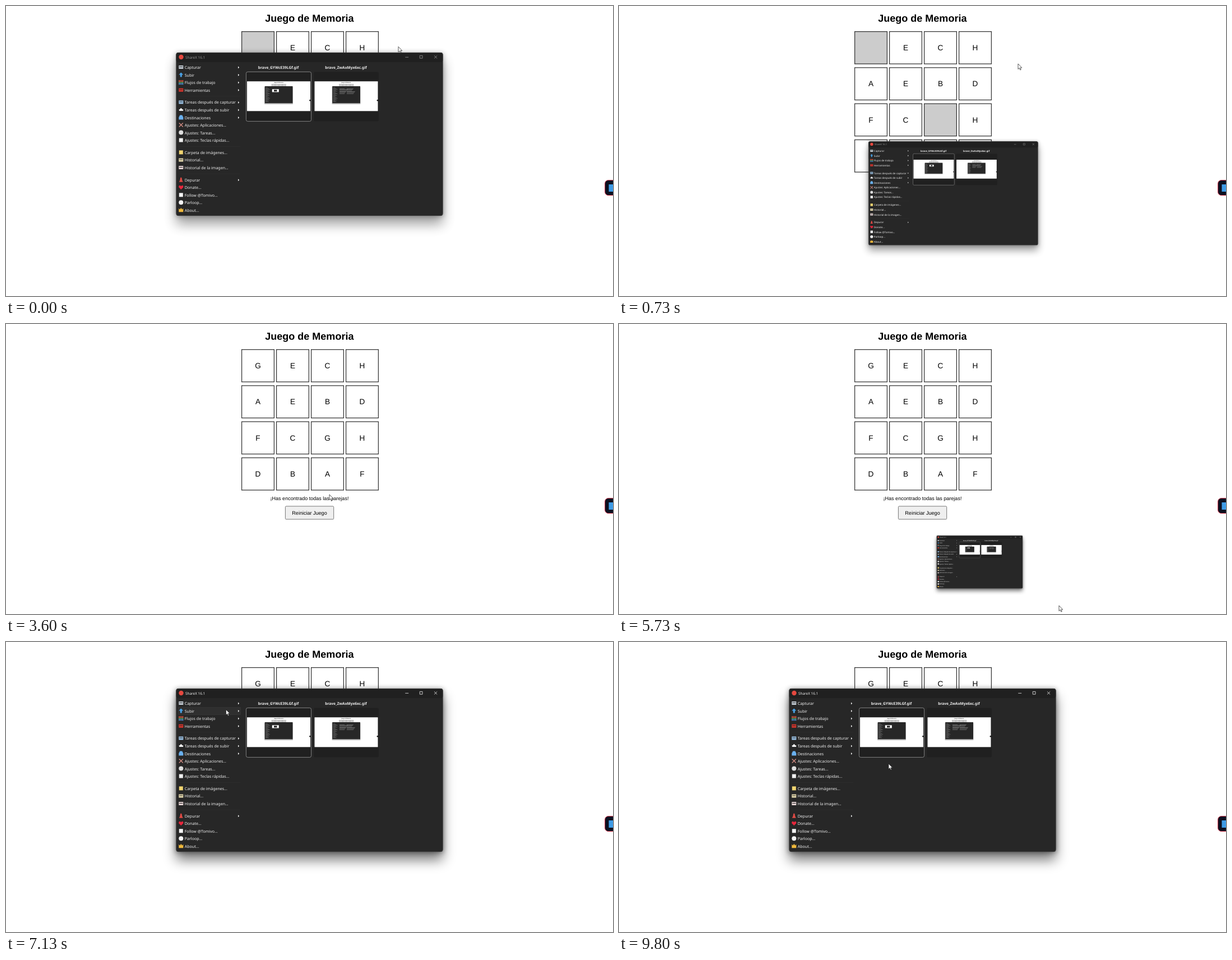
These frames come from a looping animation (1083 by 517 pixels, 9870 ms). An HTML page:

```html
<!DOCTYPE html>
<html lang="es">
<head>
<meta charset="utf-8">
<title>Juego de Memoria</title>
<style>
html, body { margin: 0; width: 100%; height: 100%; overflow: hidden; background: #fff; }
svg { display: block; width: 1083px; height: 517px; }
text { font-family: "Liberation Sans", Arial, sans-serif; text-rendering: geometricPrecision; }
.ui text { font-family: "Noto Sans", "Open Sans", sans-serif; fill: #f0f0f0; }
.ui .tiny { fill: #111; }
.mid { text-anchor: middle; }
</style>
</head>
<body>
<svg viewBox="0 0 1083 517">
  <defs>
    <filter id="soft" x="-20%" y="-30%" width="140%" height="160%"><feGaussianBlur stdDeviation="11"/></filter>
    <filter id="near" x="-20%" y="-20%" width="140%" height="140%"><feGaussianBlur stdDeviation="5"/></filter>
    <linearGradient id="rgb" x2="0" y2="1">
      <stop offset=".3" stop-color="#e0503c"/><stop offset=".5" stop-color="#4fae4a"/><stop offset=".8" stop-color="#4a8fe0"/>
    </linearGradient>
  </defs>
  <g id="page"></g>
  <g id="win" class="ui"></g>
  <g id="badge"></g>
  <path id="arrow" d="M0 0V9.6L2.2 7.6L3.8 11.1L5.3 10.4L3.8 7.1H6.8Z" fill="#fff" stroke="#222" stroke-width=".75"/>
  <g id="hand" fill="#fff" stroke="#222" stroke-width=".75">
    <path d="M-1 .8Q0-.6 1 .8V4.6L4.6 5.3Q6 5.6 5.9 7L5.3 10.4L4.5 12.9H-.6L-1.2 11.4L-3.7 7.9Q-4 6.4-3 6.2Q-2 6.2-1 7.4Z"/>
    <path d="M1.9 4.8V6.6M3.5 5.1V6.8" stroke-width=".5"/>
  </g>
</svg>
<script>
const $ = id => document.getElementById(id);
const page = $('page'), win = $('win');

function add(parent, tag, attrs, text) {
  const el = document.createElementNS('http://www.w3.org/2000/svg', tag);
  for (const k in attrs) el.setAttribute(k, attrs[k]);
  if (text) el.textContent = text;
  parent.append(el);
  return el;
}
const box = (p, x, y, width, height, fill, more) => add(p, 'rect', { x, y, width, height, fill, ...more });
const label = (p, x, y, size, text, more) => add(p, 'text', { x, y, 'font-size': size, ...more }, text);
const line = (p, d, stroke, width) => add(p, 'path', { d, stroke, fill: 'none', 'stroke-width': width });
const show = (el, on) => { el.style.display = on ? '' : 'none'; };

// Page
label(page, 541.3, 28, 18.05, 'Juego de Memoria', { class: 'mid', 'font-weight': 'bold' });
const cards = [...'GECHAEBDFCGHDBAF'].map((ch, i) => {
  const x = 420.6 + i % 4 * 62, y = 45.6 + Math.floor(i / 4) * 64.3;
  const face = box(page, x, y, 57.8, 57.6, '#fff', { stroke: '#333', 'stroke-width': 1.25 });
  const letter = label(page, x + 28.9, y + 33.4, 13.6, ch, { class: 'mid' });
  return { x, y, face, letter };
});
const message = label(page, 541.5, 313.5, 9.02, '¡Has encontrado todas las parejas!', { class: 'mid' });
const button = box(page, 498.4, 324.9, 86.3, 23.2, '#efefef', { stroke: '#767676', rx: 1.5 });
label(page, 541.5, 339.6, 9.05, 'Reiniciar Juego', { class: 'mid' });

box($('badge'), 1068.6, 310.6, 24, 27, '#0c1020', { rx: 6, stroke: '#d8384c' });
box($('badge'), 1075.5, 318, 12, 13, '#3f9be6');

// Application window
const W = { x: 303.5, y: 83, w: 476, h: 291 };
const glow = add(win, 'g', {});
box(glow, W.x, W.y + 15, W.w, W.h, '#000', { filter: 'url(#soft)', opacity: .5 });
box(glow, W.x, W.y + 1, W.w, W.h, '#000', { filter: 'url(#near)', opacity: .45 });
box(win, W.x, W.y, W.w, W.h, '#272727', { rx: 4 });
box(win, W.x, W.y, W.w, 17, '#202020', { rx: 4 });
box(win, W.x + .3, W.y + .3, W.w - .6, W.h - .6, 'none', { rx: 4, stroke: '#444', 'stroke-width': .6 });
add(win, 'circle', { cx: 312.5, cy: 91, r: 4.2, fill: '#e5483f' });
const bar = add(win, 'g', {});
label(bar, 320, 93.5, 6.4, 'ShareX 16.1');
line(bar, 'M712.3 91.3H718.2M738.3 88.4H743V93.2H738.3ZM764 88.4L769.2 93.5M769.2 88.4L764 93.5', '#f0f0f0', .8);
const hover = box(win, 307.4, 0, 111, 13, '#2f2f2f', { stroke: '#3a3a3a', 'stroke-width': .6 });

// Icon outlines in an 8 by 8 box
const shapes = {
  sheet: 'M0 1H8V7H0ZM1 3V4H7V3Z',
  square: 'M.5 .5H7.5V7.5H.5Z',
  disc: 'M0 4A4 4 0 0 1 8 4A4 4 0 0 1 0 4Z',
  up: 'M4 0L8 4H5.5V8H2.5V4H0Z',
  dots: 'M0 0H2V8H0ZM3 0H5V8H3ZM6 0H8V8H6Z',
  cloud: 'M1 6Q-1 3 2 3Q4-1 6 3Q9 3 7.5 6Z',
  drive: 'M2 0H6L8 4V8H0V4Z',
  cross: 'M1 0L4 3L7 0L8 1L5 4L8 7L7 8L4 5L1 8L0 7L3 4L0 1Z',
  cone: 'M3 0H5L6 5L7.5 8H.5L2 5Z',
  heart: 'M4 8L0 4Q-.5 .5 2.2 .5L4 2L5.8 .5Q8.5 .5 8 4Z',
  crown: 'M0 1L2 3L4 0L6 3L8 1V7.5H0Z'
};

// Each row: shape, colour, text; > opens a submenu, - is a gap
const menu = `sheet #c4ccd4 Capturar>
up #4aa3e8 Subir>
dots url(#rgb) Flujos de trabajo>
sheet #d8342c Herramientas>
-
sheet #9cc4e8 Tareas después de capturar>
cloud #eee Tareas después de subir>
drive #6ab0ee Destinaciones>
cross #cf8a80 Ajustes: Aplicaciones...
disc #ddd Ajustes: Tareas...
square #eee Ajustes: Teclas rápidas...
-
square #f0d470 Carpeta de imágenes...
sheet #e8dcb0 Historial...
sheet #e0d0d0 Historial de la imagen...
-
cone #e04a44 Depurar>
heart #e8263c Donate...
square #f4f4f4 Follow @Tomivo...
disc #f4f4f4 Parloop...
crown #f0b93c About...`;
const captures = `sheet #ddd Pantalla completa
sheet #9cc4e8 Ventana>
sheet #ccc Monitor>
square #ddd Región
square #ddd Región (Ligera)
square #ddd Región (Transparente)
sheet #e8dcb0 Última región
sheet #ddd Grabación de pantalla
sheet #ddd Grabación de pantalla (GIF)
square #ddd Captura deslizante...
disc #ddd Autocaptura...
-
up #eee Mostrar cursor
disc #9cc4e8 Retraso de captura>`;

function list(p, src, x, y, step, gap, right, size) {
  const rows = [];
  for (const row of src.split('\n')) {
    if (row === '-') {
      line(p, `M${x} ${y - step / 2 + gap / 2}H${right}`, '#303030', .7);
      y += gap;
      continue;
    }
    const [, shape, fill, text, more] = row.match(/^(\S+) (\S+) (.*?)(>?)$/);
    add(p, 'path', { d: shapes[shape], fill, transform: `translate(${x} ${y - 4.4}) scale(${size / 8})` });
    label(p, x + size + 2.4, y + 2.6, 7.05, text);
    if (more) add(p, 'path', { d: `M${right - 4} ${y - 2}l2.2 2l-2.2 2Z`, fill: '#f4f4f4' });
    rows.push(y);
    y += step;
  }
  return rows;
}
const rows = list(win, menu, 308.3, 109.5, 13.52, 8.3, 418, 8);

function thumb(x, name, border) {
  label(win, x + 58, 112, 6.6, name, { class: 'mid', 'font-weight': 'bold' });
  box(win, x + .4, 117.4, 116.2, 88.2, '#202020', { rx: 3, stroke: border, 'stroke-width': .8 });
  const g = add(win, 'g', { transform: `translate(${x + 2} 134.3)` });
  box(g, 0, 0, 113, 53, '#fff');
  label(g, 56.5, 3, 1.9, 'Juego de Memoria', { class: 'mid tiny', 'font-weight': 'bold' });
  for (let i = 0; i < 4; i++) box(g, 44 + i * 6.5, 5, 6, 5, '#ccc', { stroke: '#777', 'stroke-width': .3 });
  box(g, 31, 10, 51, 31, '#000', { opacity: .25, rx: 1 });
  box(g, 31.7, 8.7, 49.8, 30.3, '#272727');
  for (let i = 0; i < 17; i++) box(g, 33, 11.2 + i * 1.55, 4 + i * 7 % 5, .6, '#777');
  add(g, 'circle', { cx: 112.4, cy: 34, r: 1.3, fill: '#111' });
  return g;
}
const first = thumb(428, 'brave_GYWcE39LGf.gif', '#999');
box(first, 44.8, 14, 12, 5.2, '#fff');
box(first, 48, 15.1, 5.5, 3, '#222');
const second = thumb(548.5, 'brave_ZwAxMyx6xc.gif', 'none');
for (let i = 0; i < 16; i++) box(second, 44.5 + i % 2 * 13, 12.7 + (i >> 1) * 1.3, 9 + i * 3 % 7, .5, '#888');

// Capture submenu
const drop = add(win, 'g', {});
box(drop, 419.4, 103.4, 151.2, 163.2, '#272727', { stroke: '#3c3c3c', 'stroke-width': .8 });
const dropHover = box(drop, 421, 0, 148, 12, '#333', { stroke: '#3e3e3e', 'stroke-width': .6 });
const dropRows = list(drop, captures, 424, 110.4, 12.3, 3.6, 569, 7);

// Pointer stops: ms, x, y
const stops = [
  [0, 700, 72.5], [400, 715, 91], [600, 715, 91], [733, 712, 103], [1267, 625, 240], [1600, 577, 210],
  [2200, 443, 59.5], [2733, 443, 59.5], [3600, 577, 304], [4000, 658, 326], [4400, 481, 340], [4733, 604, 346],
  [5133, 808, 520], [5667, 785, 530], [5733, 785, 502], [6533, 365, 106], [6867, 365, 108], [7133, 392.5, 120.5],
  [7600, 410, 108], [7900, 410, 108], [9200, 478, 208], [9533, 478, 208], [9800, 481, 217]
];
const clamp = u => Math.min(1, Math.max(0, u));
const ease = u => u * u * (3 - 2 * u);

function pointer(t) {
  const i = stops.findIndex(s => s[0] > t);
  if (i < 0) return stops.at(-1).slice(1);
  const [t0, x0, y0] = stops[i - 1], [t1, x1, y1] = stops[i];
  const u = ease((t - t0) / (t1 - t0));
  return [x0 + (x1 - x0) * u, y0 + (y1 - y0) * u];
}

// Shrinks with growing speed, comes back slowing down
const zoom = t => t < 2000
  ? 1 - .815 * clamp((t - 600) / 200) ** 2
  : 1 - 1.61 * (1 - clamp((t - 5667) / 267)) ** 3;

const inside = (x, y, bx, by, w, h) => x >= bx && x < bx + w && y >= by && y < by + h;

function mark(el, list, y, height) {
  const row = list.find(r => Math.abs(r - y) < height / 2);
  show(el, row !== undefined);
  if (row !== undefined) el.setAttribute('y', row - height / 2 + .3);
}

function drawWindow(t, x, y) {
  const s = zoom(t), d = 1 - s, active = t > 5733;
  win.setAttribute('transform', `translate(${541.5 + 150.3 * d} ${228.5 + 288.7 * d}) scale(${s}) translate(-541.5 -228.5)`);
  glow.setAttribute('opacity', active ? 1 : .75);
  bar.setAttribute('opacity', active ? 1 : .55);
  const dropped = t > 7600 && t < 9600;
  const over = active && s === 1 && inside(x, y, 307, 103, 111, 269);
  show(drop, dropped);
  mark(hover, rows, dropped ? rows[0] : over ? y : 0, 13.4);
  mark(dropHover, dropRows, x > 420 ? y : 0, 12.3);
}

function draw(ms) {
  // Fifteen pictures a second
  const t = Math.floor((ms % 9870 + 4) * .015) / .015 + .5;
  const [x, y] = pointer(t);
  const open = t < 799 || t > 5733;
  show(win, open);
  if (open) drawWindow(t, x, y);

  cards.forEach((c, i) => {
    const hidden = i === 0 && t < 2533 || i === 10 && t < 1600;
    c.face.setAttribute('fill', hidden ? '#ccc' : '#fff');
    show(c.letter, !hidden);
  });
  show(message, t > 2533);

  const onButton = !open && inside(x, y, 498, 324, 87, 24);
  button.setAttribute('fill', onButton ? '#e5e5e5' : '#efefef');
  const point = onButton || !open && cards.some(c => inside(x, y, c.x, c.y, 58, 58));
  show($('hand'), point);
  show($('arrow'), !point);
  $(point ? 'hand' : 'arrow').setAttribute('transform', `translate(${x} ${y})`);
}

const start = performance.now();
function tick() {
  draw(performance.now() - start);
  requestAnimationFrame(tick);
}
tick();
</script>
</body>
</html>
```
